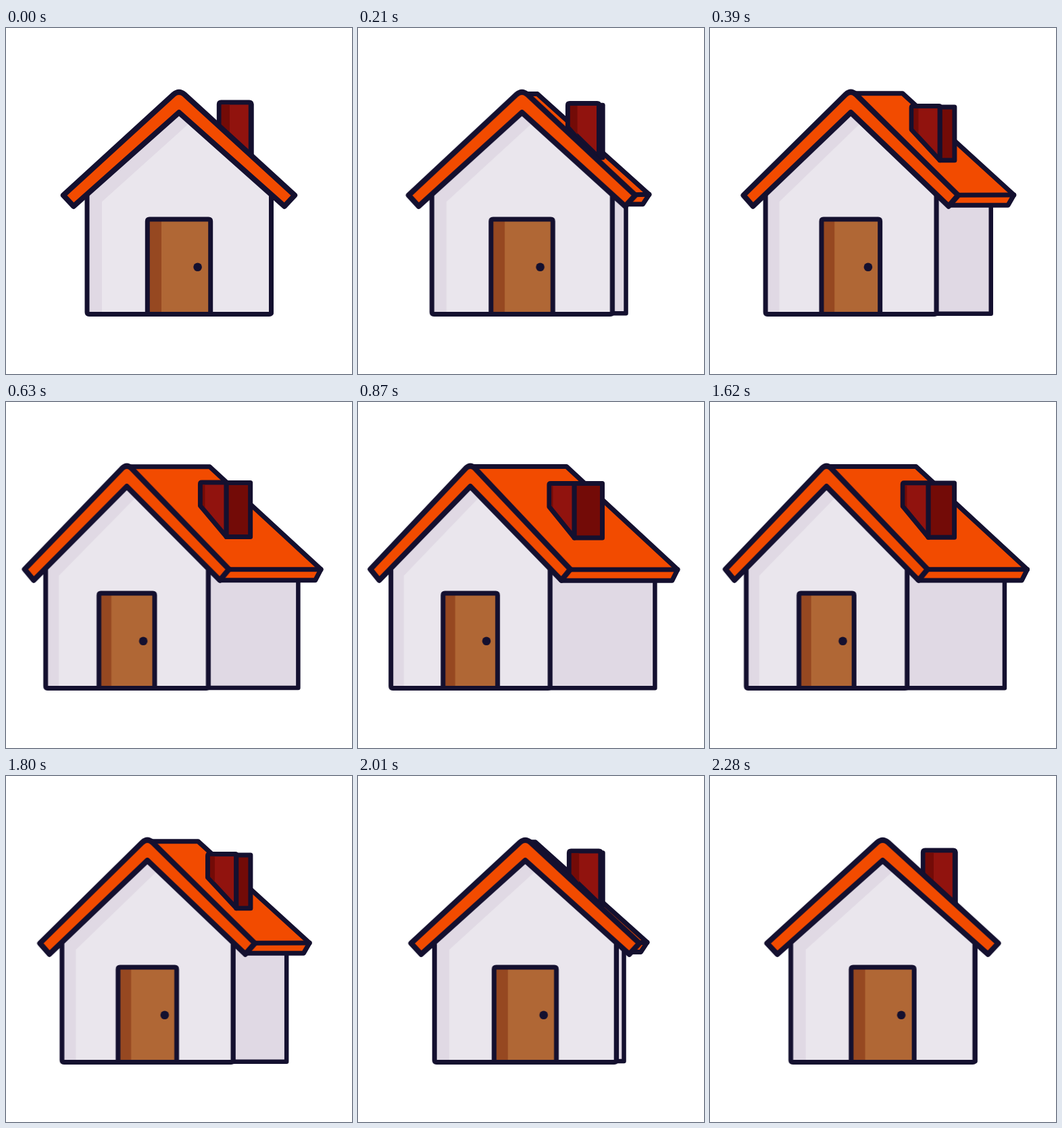
Animation, 512 px wide and 512 px high, one loop 4.31 s. Source, as an HTML page without scripts:

```html
<!DOCTYPE html>
<html lang="en">
<head>
<meta charset="utf-8">
<title>House</title>
<style>
  html, body { margin: 0; width: 100%; height: 100%; overflow: hidden; background: #fff; }
  svg { display: block; width: 100vw; height: 100vh; }

  .line { stroke: #14102f; stroke-width: 7; stroke-linejoin: round; stroke-linecap: round; }
  .thin { stroke-width: 6.5; }
  .bold { stroke-width: 8; }
  .knob { stroke-width: 12.6; }
  .front * { vector-effect: non-scaling-stroke; }

  .wall { fill: #eae6ed; }
  .shade { fill: #e0d9e4; }
  .roof { fill: #f24b00; }
  .door { fill: #b06735; }
  .door-shade { fill: #964821; }
  .brick { fill: #91130e; }
  .brick-shade { fill: #730b07; }
  .none { fill: none; }

  /* Each depth part morphs from --a (closed) to --b (open). */
  .depth { d: var(--a); animation: morph 4310ms infinite; }
  .front { transform-origin: 0 0; animation: squeeze 4310ms infinite; }

  @keyframes morph {
    0% { d: var(--a); animation-timing-function: cubic-bezier(.33, 0, .2, 1); }
    27.842% { d: var(--b); animation-timing-function: cubic-bezier(.871, 0, .26, .919); }
    52.9%, 100% { d: var(--a); }
  }
  @keyframes squeeze {
    0% { transform: translateX(0) scaleX(1); animation-timing-function: cubic-bezier(.33, 0, .2, 1); }
    27.842% { transform: translateX(-57.8px) scaleX(.857); animation-timing-function: cubic-bezier(.871, 0, .26, .919); }
    52.9%, 100% { transform: translateX(-.32px) scaleX(.9992); }
  }
</style>
</head>
<body>
<svg viewBox="0 0 512 512">
  <!-- side wall -->
  <path class="depth line thin shade" style="
    --a: path('M392.5 240 L389 240 L389 422 L392.5 422 Z');
    --b: path('M278.6 240 L442 240 L442 423.3 L278.6 423.3 Z')"/>

  <!-- roof slope and eave -->
  <path class="depth line roof" style="
    --a: path('M256 98 L258 98 L423.5 246 L414 260 L412 260 Z');
    --b: path('M161.6 95.3 L311 95.3 L475.5 248 L467.5 264.5 L295.3 264.5 Z')"/>
  <path class="depth line none" style="
    --a: path('M423 246.5 L423.5 246');
    --b: path('M308.3 248 L475.5 248')"/>

  <!-- chimney -->
  <path class="depth line brick" style="
    --a: path('M315.3 113 Q315.3 110 318.3 110 L360 110 Q363 110 363 113 L363 190 L315.3 145 Z');
    --b: path('M281.3 123 Q281.3 121 283.3 121 L318 121 Q318 121 318 121 L318 201.6 L281.3 155.5 Z')"/>
  <path class="depth brick-shade" style="
    --a: path('M318.7 113.4 L331 113.4 L331 158 L318.7 144 Z');
    --b: path('M284.7 124.4 L286.3 124.4 L286.3 156 L284.7 154 Z')"/>
  <path class="depth line brick-shade" style="
    --a: path('M363 113 L362.3 113 L362.3 190 L363 190 Z');
    --b: path('M318 121 L361.5 121 L361.5 201.6 L318 201.6 Z')"/>

  <g class="front">
    <path class="wall" d="M120 423.5V245L256 125L392.5 245V423.5Z"/>
    <path class="shade" d="M120 423.5V245L256 125L271 141L142 257V423.5Z"/>
    <path class="door" d="M209.3 423.5V283H302.7V423.5Z"/>
    <path class="door-shade" d="M209.3 423.5V283H230V423.5Z"/>
    <path class="line none" d="M209.3 423.5V286q0 -3 3 -3H299.7q3 0 3 3V423.5"/>
    <path class="line none knob" d="M283.6 353.8h.01"/>
    <path class="line none" d="M120 245V420.5q0 3 3 3H389.5q3 0 3 -3V245"/>
    <path class="line bold roof" d="M84.8 247.5L248 98.2Q256 91.4 264 98.2L427.2 247.5L412 263.7L256 125L100 263.7Z"/>
  </g>
</svg>
</body>
</html>
```
